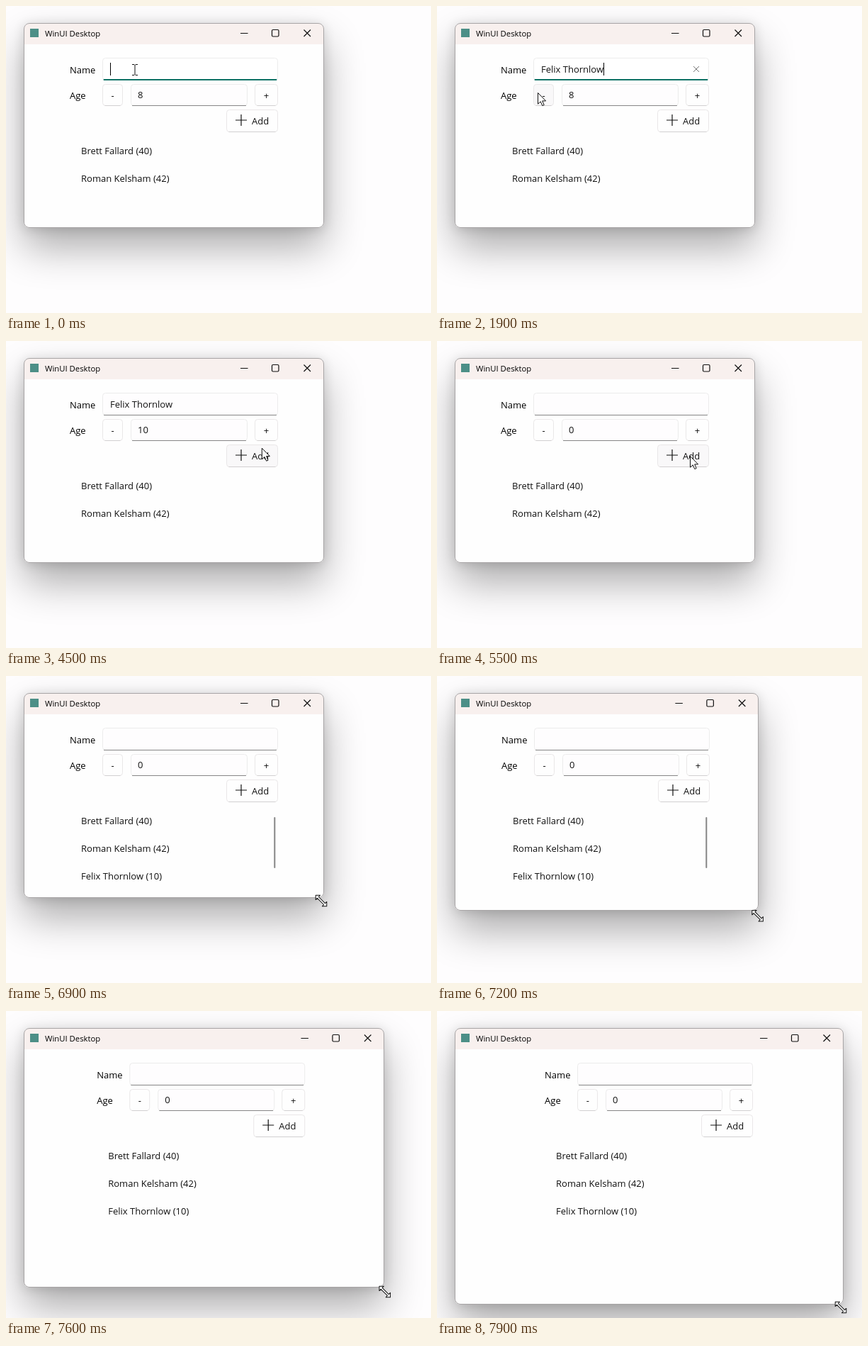
These frames come from a looping animation (600x433 px, 8 s). An HTML page:

```html
<!DOCTYPE html>
<html lang="en">
<head>
<meta charset="utf-8">
<title>Desktop form</title>
<style>
  html, body { margin: 0; width: 100%; height: 100%; overflow: hidden; background: #fefdfe; }
  #window {
    position: absolute; left: 25px; top: 24px; box-sizing: border-box;
    border: 1px solid #a8a5a6; border-radius: 8px;
    background: linear-gradient(#f8f0ee 29px, #fefefe 29px);
    box-shadow: 0 28px 56px rgba(0,0,0,.32), 0 2px 16px rgba(0,0,0,.14);
  }
  svg { position: absolute; left: 0; top: 0; }
  text { font: 13px 'Open Sans', 'Noto Sans', sans-serif; fill: #111; white-space: pre; }
  .title { font-size: 11.3px; fill: #000; }
  .label { fill: #000; }
  .mid { text-anchor: middle; }
  .line { fill: none; stroke: #111; }
  .field { fill: #fefdfe; stroke: #ececec; }
  .under { stroke: #868686; stroke-linecap: round; }
  .button rect { fill: #fefefe; stroke: #e9e7e8; }
  .button .edge { stroke: #d2d0d1; }
  .button.hover rect { fill: #f9f8f9; }
  .button.pressed rect { fill: #f7f6f7; }
  .button.pressed text { fill: #777; }
  .button.pressed .line { stroke: #777; }
  .focus .field { fill: #fff; }
  .focus .under { stroke: #0f7266; stroke-width: 2; transform: translateY(-.5px); }
  .pointer { fill: #fff; stroke: #111; stroke-linejoin: round; }
</style>
</head>
<body>
<div id="window"></div>
<svg width="600" height="433">
  <rect x="34" y="32" width="12" height="12" fill="#4c8f87"/>
  <text class="title" x="55" y="42.5">WinUI Desktop</text>

  <g id="caption" class="line" stroke-width="1.2">
    <path d="M331 38.5H341.5M420.5 33.5L430 43M430 33.5L420.5 43"/>
    <rect x="375.5" y="33.5" width="9.5" height="9.5" rx="1.5"/>
  </g>

  <g id="content">
    <text class="label" x="90" y="95">Name</text>
    <text class="label" x="90" y="131">Age</text>

    <g id="nameBox">
      <rect class="field" x="136.5" y="73.5" width="247" height="31" rx="4"/>
      <path class="under" d="M138.5 104.5H381.5"/>
      <text id="name" x="147" y="94"></text>
      <path id="caret" d="M.5 80V98" stroke="#000"/>
      <path id="clear" d="M362 85L370 93M370 85L362 93" stroke="#777"/>
    </g>

    <g class="button" id="minus">
      <rect x="136.5" y="110.5" width="28" height="30" rx="4"/>
      <path class="edge" d="M139.5 140.5H161.5"/>
      <text class="mid" x="150.7" y="130.5">-</text>
    </g>
    <rect class="field" x="176.5" y="110.5" width="164" height="30" rx="4"/>
    <path class="under" d="M178.5 140.5H338.5"/>
    <text id="age" x="186" y="130"></text>
    <g class="button" id="plus">
      <rect x="351.5" y="110.5" width="32" height="30" rx="4"/>
      <path class="edge" d="M354.5 140.5H380.5"/>
      <text class="mid" x="367.5" y="130.5">+</text>
    </g>
    <g class="button" id="add">
      <rect x="311.5" y="146.5" width="72" height="31" rx="4"/>
      <path class="edge" d="M314.5 177.5H380.5"/>
      <path class="line" d="M324 161H340M332 153V169" stroke-width="1.2"/>
      <text x="347" y="166.5">Add</text>
    </g>

    <text x="106" y="208.5">Brett Fallard (40)</text>
    <text x="106" y="247.5">Roman Kelsham (42)</text>
    <text id="newItem" x="106" y="286.5">Felix Thornlow (10)</text>
    <path id="scrollbar" d="M379.3 200V270" stroke="#858585" stroke-width="2" stroke-linecap="round"/>
  </g>

  <path id="beam" class="line" d="M178 82.5H181L182 83.5 183 82.5H186M182 83.5V96.5M178 97.5H181L182 96.5 183 97.5H186"/>
  <path id="arrow" class="pointer" d="M.5 .5V16.2L4.2 12.8 6.8 18.6 9.2 17.6 6.7 11.9H11.6Z"/>
  <path id="resize" class="pointer" d="M-11 0L-6.5 -4.5V-1.3H6.5V-4.5L11 0 6.5 4.5V1.3H-6.5V4.5Z"/>
</svg>
<script>
const LOOP = 8000, STEP = 100;
const FULL_NAME = 'Felix Thornlow';
const el = id => document.getElementById(id);

// Runs of typing, one character per step
const bursts = [
  { start: 100, count: 3 }, { start: 600, count: 3 },
  { start: 1000, count: 1 }, { start: 1200, count: 7 }
];

// Moments when each button is released
const clicks = { minus: [2200], plus: [3100, 3500, 3800], add: [5400] };
const PRESS = 200;

// Places where the pointer rests
const stops = [
  { arrive: 1800, leave: 1800, x: 160, y: 153 },
  { arrive: 1900, leave: 2400, x: 142, y: 122 },
  { arrive: 2900, leave: 4000, x: 369, y: 126 },
  { arrive: 4800, leave: 5800, x: 357, y: 162 },
  { arrive: 6500, leave: LOOP, x: 439, y: 311 }
];
const GRAB = 6700;

const clamp = (v, lo, hi) => Math.min(hi, Math.max(lo, v));
const progress = (t, from, to) => clamp((t - from) / (to - from), 0, 1);
const smooth = u => u * u * (3 - 2 * u);
const mix = (a, b, u) => a + (b - a) * u;

function typedCount(t) {
  return bursts.reduce((n, b) => n + clamp((t - b.start) / STEP + 1, 0, b.count), 0);
}

function ageAt(t) {
  const count = id => clicks[id].filter(c => c <= t).length;
  return count('add') ? 0 : 8 + count('plus') - count('minus');
}

// Bottom right corner of the window while it is dragged
function cornerAt(t) {
  const u = progress(t, 7100, 7900);
  return { x: mix(448.5, 573.5, smooth(u)), y: mix(313, 414, 1 - (1 - u) ** 1.45) };
}

function pointerAt(t) {
  if (t >= GRAB) {
    const ahead = cornerAt(t + 20);
    return { x: ahead.x - 3.5, y: ahead.y + 4 };
  }
  const i = Math.max(1, stops.findIndex(s => s.leave > t));
  const a = stops[i - 1], b = stops[i];
  const u = smooth(progress(t, a.leave, b.arrive));
  return { x: mix(a.x, b.x, u), y: mix(a.y, b.y, u) };
}

function show(id, visible) {
  el(id).style.display = visible ? '' : 'none';
}

function move(id, x, y = 0, extra = '') {
  el(id).setAttribute('transform', `translate(${x} ${y}) ${extra}`);
}

function inside(rect, p) {
  const { x, y, width, height } = rect.getBBox();
  return p.x >= x && p.x <= x + width && p.y >= y && p.y <= y + height;
}

function draw(t) {
  const start = cornerAt(0), corner = cornerAt(t);
  el('window').style.width = corner.x - 25 + 'px';
  el('window').style.height = corner.y - 24 + 'px';
  move('caption', corner.x - start.x);
  // The centred layout trails the frame slightly
  move('content', (cornerAt(t - 40).x - start.x) / 2);

  const focused = t < 2100;
  const typed = t < clicks.add[0] ? FULL_NAME.slice(0, typedCount(t)) : '';
  el('name').textContent = typed;
  el('nameBox').classList.toggle('focus', focused);
  move('caret', 147 + (typed ? Math.round(el('name').getComputedTextLength()) : 0));
  show('caret', focused);
  show('clear', focused && typed);
  el('age').textContent = ageAt(t);

  const pointer = pointerAt(t), arrow = t >= stops[0].arrive && t < GRAB;
  for (const id in clicks) {
    const button = el(id).classList;
    button.toggle('hover', arrow && inside(el(id).querySelector('rect'), pointer));
    button.toggle('pressed', clicks[id].some(c => t >= c - PRESS && t < c));
  }

  show('newItem', t >= 5900);
  show('scrollbar', t >= 6000 && corner.y < 340);

  show('beam', t < bursts[0].start);
  show('arrow', arrow);
  show('resize', t >= GRAB);
  move('arrow', pointer.x, pointer.y);
  move('resize', pointer.x, pointer.y, 'rotate(45)');
}

const began = performance.now();
function tick() {
  const t = (performance.now() - began) % LOOP;
  draw(Math.floor(t / STEP) * STEP);
  requestAnimationFrame(tick);
}
tick();
</script>
</body>
</html>
```
